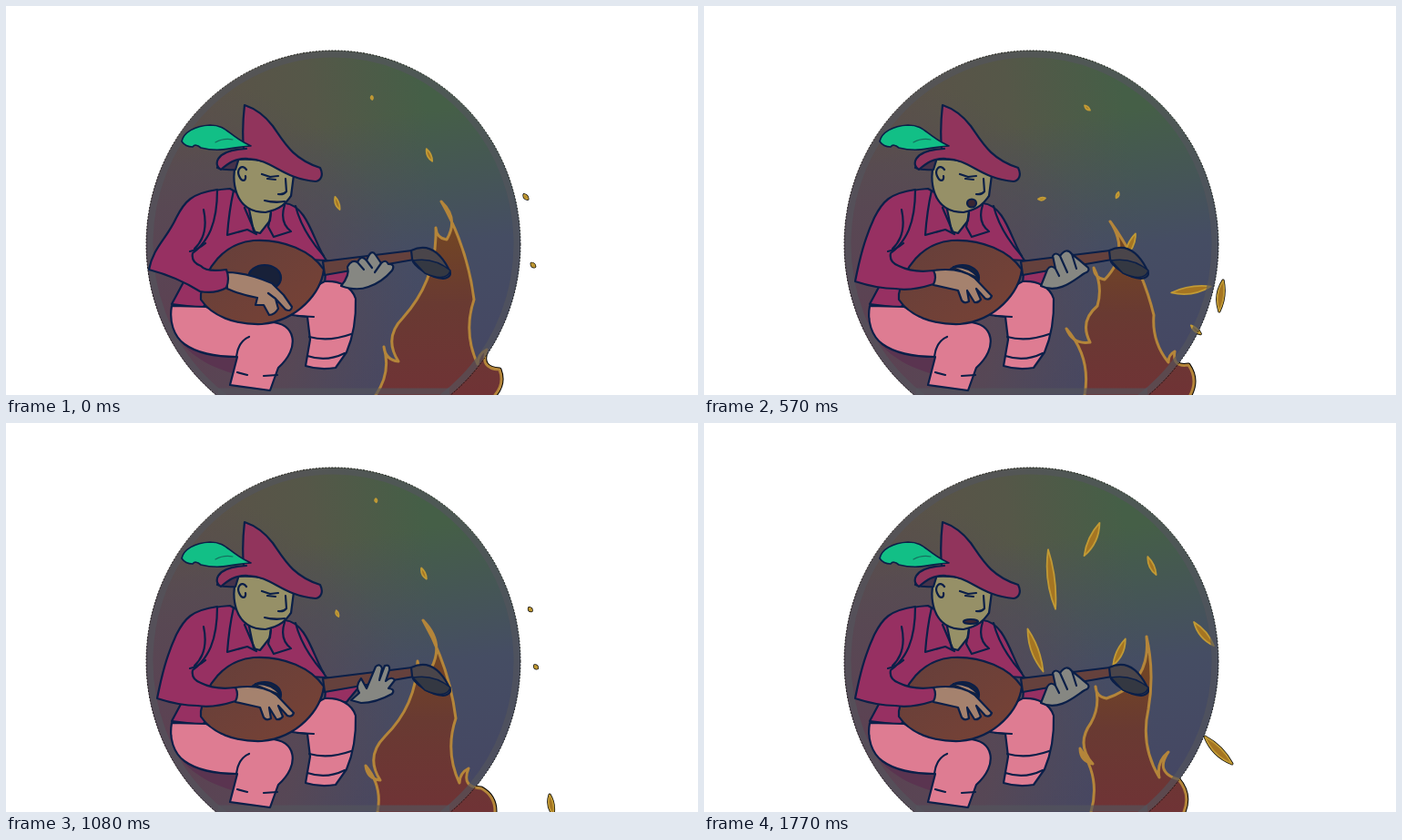
Animation, 760 px wide and 428 px high, one loop 1.8 s. Source, as an HTML page:

```html
<!DOCTYPE html>
<html lang="en">
<head>
<meta charset="utf-8">
<title>Bard by the fire</title>
<style>
html, body { margin: 0; width: 100%; height: 100%; overflow: hidden; background: #fff; }
svg { display: block; width: 100vw; height: 100vh; }
.ink { stroke: #0b1f48; stroke-width: 2.2; stroke-linejoin: round; stroke-linecap: round; }
.line { fill: none; }
.coat { fill: #973062; }
.skin { fill: #969067; }
.pants { fill: #de7c92; }
.edge { fill: #000; stroke: #000; stroke-linejoin: round; }
.mouth { fill: #3a2633; }
.fret { fill: #868782; }
.hand { fill: #a5826e; }
</style>
</head>
<body>
<svg viewBox="0 0 760 428" preserveAspectRatio="none">
<defs>
  <linearGradient id="sky" y1=".25" y2=".1">
    <stop offset=".1" stop-color="#5c5148"/><stop offset=".45" stop-color="#555748"/><stop offset=".75" stop-color="#455f47"/>
  </linearGradient>
  <linearGradient id="dusk" x1=".4" x2=".55" y2="1">
    <stop offset=".2" stop-color="#454a68" stop-opacity="0"/><stop offset=".55" stop-color="#454a68" stop-opacity=".85"/><stop offset="1" stop-color="#454463"/>
  </linearGradient>
  <radialGradient id="plum" cx=".08" cy=".72" r=".65">
    <stop offset="0" stop-color="#5d4152"/><stop offset=".5" stop-color="#594753" stop-opacity=".85"/><stop offset="1" stop-color="#524b55" stop-opacity="0"/>
  </radialGradient>
  <linearGradient id="ember" y2="1" x2="0">
    <stop offset="0" stop-color="#75491f"/><stop offset=".5" stop-color="#693a32"/><stop offset="1" stop-color="#703236"/>
  </linearGradient>
  <linearGradient id="wood" y2="1">
    <stop offset="0" stop-color="#653f3b"/><stop offset="1" stop-color="#784235"/>
  </linearGradient>
</defs>

<path id="fireEdge" class="edge" stroke-width="5"/>
<path id="sparkEdge" class="edge" stroke-width="3.2"/>
<g id="disc"></g>
<path id="fire" fill="url(#ember)" stroke="#b4853a" stroke-width="3" stroke-linejoin="round"/>
<path id="sparks" fill="#a57522" stroke="#c19a35" stroke-width="1.8" stroke-linejoin="round"/>
<g fill="none" stroke="#53555d" stroke-opacity=".65" stroke-width="7">
  <ellipse cx="359.5" cy="262" rx="201.5" ry="209"/>
  <path d="M233 424H487"/>
</g>
<ellipse cx="359.5" cy="262" rx="205.5" ry="213" fill="none" stroke="#111" stroke-width=".9" stroke-dasharray="2 1.5"/>

<g class="ink">
  <path fill="#5a3450" stroke="none" d="M181 345C188 376 215 394 248 404L254 387Z"/>
  <path class="coat" d="M246 201C230 202 205 205 198 222L205 285 182 328 216 332 260 275 352 280C338 262 332 219 306 217L290 226Z"/>
  <path class="coat" d="M352 280L388 290 374 307 350 306Z"/>
  <path class="skin" d="M265 214L272 248 279 250 290 236 291 224Z"/>
  <path class="line" d="M250 203Q245 225 243 252L265 246 275 251M291 228L288 243 294 254 313 248Q300 238 306 219M262 222L274 250M318 220Q325 248 349 275"/>
  <path class="skin" d="M253 169C247 192 250 227 285 227 305 223 309 214 313 209L316 186Q290 166 253 169Z"/>
  <path class="line" d="M264 180C259 173 253 180 256 187 259 194 264 193 263 187M281 185L290 188 299 187M287 190L296 191M307 190L308 204Q305 208 299 207"/>
  <path fill="#46334b" d="M232 178C234 170 246 166 256 167L252 180Q240 181 232 178Z"/>
  <path fill="#91345c" d="M261 157Q259 135 262 109 280 115 293 132C305 149 314 168 345 178 349 186 346 192 340 193 303 190 293 169 266 168 252 167 244 173 236 180 229 177 226 159 264 157"/>
  <path fill="#12bf86" stroke-width="1.7" d="M193 149C195 139 207 132 224 131 243 131 243 142 269 154 253 154 238 162 214 156Q208 151 205 155 197 155 193 149Z"/>
  <path class="line" stroke="#16705f" stroke-width="1.2" d="M230 150Q239 145 249 147"/>

  <path class="mouth" data-mouth="closed" d="M284 214Q295 217 306 215"/>
  <ellipse class="mouth" data-mouth="round" cx="294" cy="217" rx="5" ry="4.5"/>
  <path class="mouth" data-mouth="smile" d="M284 212L302 212Q298 222 290 219Z"/>
  <ellipse class="mouth" data-mouth="oval" cx="293" cy="219" rx="10" ry="3.5"/>
  <ellipse class="mouth" data-mouth="small" cx="293" cy="218.5" rx="8" ry="2.5"/>

  <path class="pants" d="M182 330C179 347 184 363 196 372 211 383 235 386 254 386L246 417 290 423 299 398C324 376 318 348 290 348Q250 350 220 331Z"/>
  <path class="line" d="M253 386Q255 369 267 364M254 403L265 406M283 407L298 406"/>
  <path class="pants" d="M314 340C326 324 338 308 350 303 366 302 380 309 384 322Q385 355 374 381L362 398Q345 401 329 396L334 367 331 342Z"/>
  <path class="line" d="M333 364Q354 370 379 361M331 385Q352 392 372 382M320 341L338 342"/>

  <path fill="url(#wood)" d="M214 317C219 288 239 261 272 258 305 256 336 270 349 290 346 315 321 346 281 350 251 351 226 341 214 323Z"/>
  <ellipse cx="284" cy="299" rx="18" ry="14" fill="#182139"/>
  <path fill="#65413d" d="M348 281L446 269 448 279 350 296Z"/>
  <path fill="#4a454a" d="M445 269C460 262 474 266 486 289Q492 298 480 300C467 299 447 287 446 278Z"/>
  <path fill="#343842" stroke-width="1.5" d="M447 280Q470 276 488 291C485 302 471 299 460 294Z"/>

  <path class="fret" data-fret="open" d="M368 308Q378 296 375 287 380 278 386 282 390 273 396 280 401 266 406 274L412 283Q417 278 420 284 428 284 424 291 413 304 398 309 385 314 368 308ZM386 282L393 290M396 280L402 288M412 283L405 293"/>
  <path class="fret" data-fret="curl" d="M370 308Q374 298 377 290 381 284 386 289L383 275Q386 270 391 275 398 265 404 273 412 279 422 288 424 292 418 294C408 300 390 318 370 308ZM386 289L390 297M391 275L399 293M404 273L409 289"/>
  <path class="fret" data-fret="spread" d="M379 305L388 297Q383 290 390 281L396 292 406 268Q411 264 413 270L410 283 416 267Q422 265 421 272L417 284Q424 278 427 283L420 292Q428 293 424 298 406 308 390 308Z"/>

  <path class="hand" data-hand="low" d="M242 293Q265 293 292 305L305 318 314 331Q313 337 307 334L296 322 299 333Q295 340 289 340L283 329 274 329 276 321Q258 318 243 311ZM296 322L288 316"/>
  <path class="hand" data-hand="mid" d="M252 291Q280 287 297 299L316 319Q314 324 309 322L299 311 304 323Q301 327 297 326L289 313 291 325Q286 328 283 324L279 313 252 307ZM274 287Q290 286 301 298"/>
  <path class="hand" data-hand="high" d="M259 283Q267 272 281 271 297 261 300 268 308 267 306 278L306 290Q300 309 262 299ZM281 271L289 277M300 268L290 281M306 280L294 286"/>
  <path id="arm" class="coat"/>
  <path class="line" d="M217 224Q223 252 207 267M202 270Q211 268 219 261"/>
</g>
</svg>
<script>
const STEP = 30, LOOP = 1800, CYCLE = 1020;
const el = id => document.getElementById(id);

el("disc").innerHTML = ["sky", "dusk", "plum"].map(fill =>
  `<ellipse cx="359.5" cy="262" rx="205.5" ry="213" fill="url(#${fill})"/>`).join("");

// Poses: time, left foot x, nine outline points over the tip, right foot x.
const flame = [
  [60, 408, 395,377, 411,393, 416,345, 452,262, 458,217, 494,325, 498,396, 508,380, 522,402, 537],
  [270, 408, 385,318, 412,360, 414,312, 440,280, 458,182, 512,275, 488,350, 515,343, 540,388, 554],
  [480, 424, 411,375, 427,392, 433,350, 436,298, 460,288, 480,318, 497,345, 522,318, 514,385, 532],
  [570, 418, 398,355, 424,370, 432,330, 428,288, 446,237, 494,340, 510,392, 517,380, 532,395, 534],
  [750, 425, 413,358, 427,375, 425,330, 430,290, 486,235, 488,315, 500,390, 510,362, 521,392, 527]
];
// The cycle opens on a slightly sunken first pose.
const sunken = time => flame[0].map((v, i) => i === 0 ? time : i % 2 ? v - (i === 9 ? 18 : 2) : i === 20 ? v : v + 20);
const opening = sunken(0), closing = sunken(CYCLE);
flame.unshift(opening);
flame.push(closing);
const bulge = [-.12, -.2, .2, -.1, -.2, -.2, .05, -.1, .15, -.35, .15];

// Start and end time, tilt, then x, y and length at both ends.
const sparkTracks = [
  [750, 1020, 70, 364,250,50, 364,217,15],
  [750, 1020, 65, 492,157,22, 465,164,15],
  [750, 1020, 50, 549,232,34, 571,210,6],
  [570, 740, 42, 540,356,14, 564,359,40],
  [750, 1020, 45, 565,360,42, 579,285,5],
  [750, 1020, 83, 382,172,66, 402,101,4],
  [750, 930, -65, 426,128,40, 414,108,6],
  [60, 260, 80, 599,420,22, 589,377,53],
  [270, 570, 97, 589,375,55, 568,319,34],
  [270, 570, 42, 444,165,19, 421,112,8],
  [480, 570, -68, 458,196,16, 454,208,7],
  [480, 570, -8, 382,210,14, 371,212,8],
  [480, 570, -9, 552,338,26, 535,312,44],
  [570, 750, -65, 468,263,28, 456,252,32]
];

// Strum poses: elbow, underside bend, cuff bottom, cuff top.
const strums = {
  D: { hand: "low", arm: [157,290, 218,321, 242,310, 242,290] },
  C: { hand: "low", arm: [161,300, 224,321, 244,311, 244,290] },
  B: { hand: "mid", arm: [166,303, 215,318, 252,306, 252,291] },
  A: { hand: "high", arm: [174,308, 235,334, 264,303, 259,283] }
};
const strumOrder = "DDCBBBAAAAABBBCD";
const mouthTimes = [[0, "closed"], [120, "round"], [660, "smile"], [900, "closed"], [1290, "oval"], [1650, "small"]];
const fretTimes = [[0, "open"], [420, "curl"], [930, "spread"], [1320, "curl"]];

const mix = (a, b, k) => a + (b - a) * k;
const pick = (list, t) => list.filter(([start]) => t >= start).pop()[1];

function flamePath(t) {
  const i = Math.max(0, flame.findIndex(pose => pose[0] > t) - 1);
  const a = flame[i], b = flame[i + 1], k = (t - a[0]) / (b[0] - a[0]);
  const v = a.slice(1).map((n, j) => mix(n, b[j + 1], k));
  const points = [[v[0], 428]];
  for (let j = 1; j < v.length - 1; j += 2) points.push([v[j], v[j + 1]]);
  points.push([v[v.length - 1], 428]);
  const [sx, sy] = points[4];
  points.splice(5, 0, [sx + 12, sy + 13]);
  const curves = bulge.map((k, j) => {
    const [x, y] = points[j], [u, w] = points[j + 1];
    return `Q${(x + u) / 2 + (w - y) * k * 2} ${(y + w) / 2 - (u - x) * k * 2} ${u} ${w}`;
  });
  return `M${v[0]} 428${curves.join("")}V440H${v[0]}Z`;
}

function sparkPath(t, [from, to, tilt, x0, y0, len0, x1, y1, len1]) {
  const k = (t - from) / (to - from), x = mix(x0, x1, k), y = mix(y0, y1, k);
  const len = Math.max(4, mix(len0, len1, k)), w = Math.min(9, 2 + len * .18);
  const a = tilt * Math.PI / 180, cos = Math.cos(a), sin = Math.sin(a);
  const at = (along, side) => `${x + cos * along - sin * side} ${y + sin * along + cos * side}`;
  const tail = at(-len / 2, 0), tip = at(len / 2, 0);
  return `M${tail}Q${at(0, w)} ${tip}Q${at(0, -w * .7)} ${tail}Z`;
}

// Sparks still alive at the end of a cycle fade just after it.
function sparksPath(t) {
  let d = "";
  for (const track of sparkTracks)
    for (const time of [t, t + CYCLE]) {
      const end = track[1] === CYCLE ? CYCLE + 60 : track[1];
      if (time >= track[0] && time <= end) d += sparkPath(time, track);
    }
  return d;
}

function armPath([ex, ey, bx, by, lx, ly, ux, uy]) {
  return `M232 202C204 206 196 215 187 233 176 257 ${ex + 5} ${ey - 25} ${ex} ${ey}` +
    `Q${(ex + bx) / 2} ${ey + 8} ${bx - 5} ${by - 7}Q${bx + 12} ${by - 4} ${lx} ${ly}` +
    `Q${ux + 4} ${(ly + uy) / 2} ${ux} ${uy}Q${ux - 22} ${uy + 3} 214 286Q203 282 205 272C222 259 232 240 232 202`;
}

function show(kind, name) {
  for (const part of document.querySelectorAll(`[data-${kind}]`))
    part.style.display = part.dataset[kind] === name ? "" : "none";
}

function draw(now) {
  const frame = Math.floor(now % LOOP / STEP), t = frame * STEP, c = t % CYCLE;
  const set = (d, ...ids) => ids.forEach(id => el(id).setAttribute("d", d));
  set(flamePath(c), "fire", "fireEdge");
  set(sparksPath(c), "sparks", "sparkEdge");
  const strum = strums[strumOrder[frame % strumOrder.length]];
  set(armPath(strum.arm), "arm");
  show("hand", strum.hand);
  show("mouth", pick(mouthTimes, t));
  show("fret", pick(fretTimes, t));
}

let start;
function tick(now) {
  start ??= now;
  draw(now - start);
  requestAnimationFrame(tick);
}
draw(0);
requestAnimationFrame(tick);
</script>
</body>
</html>
```
